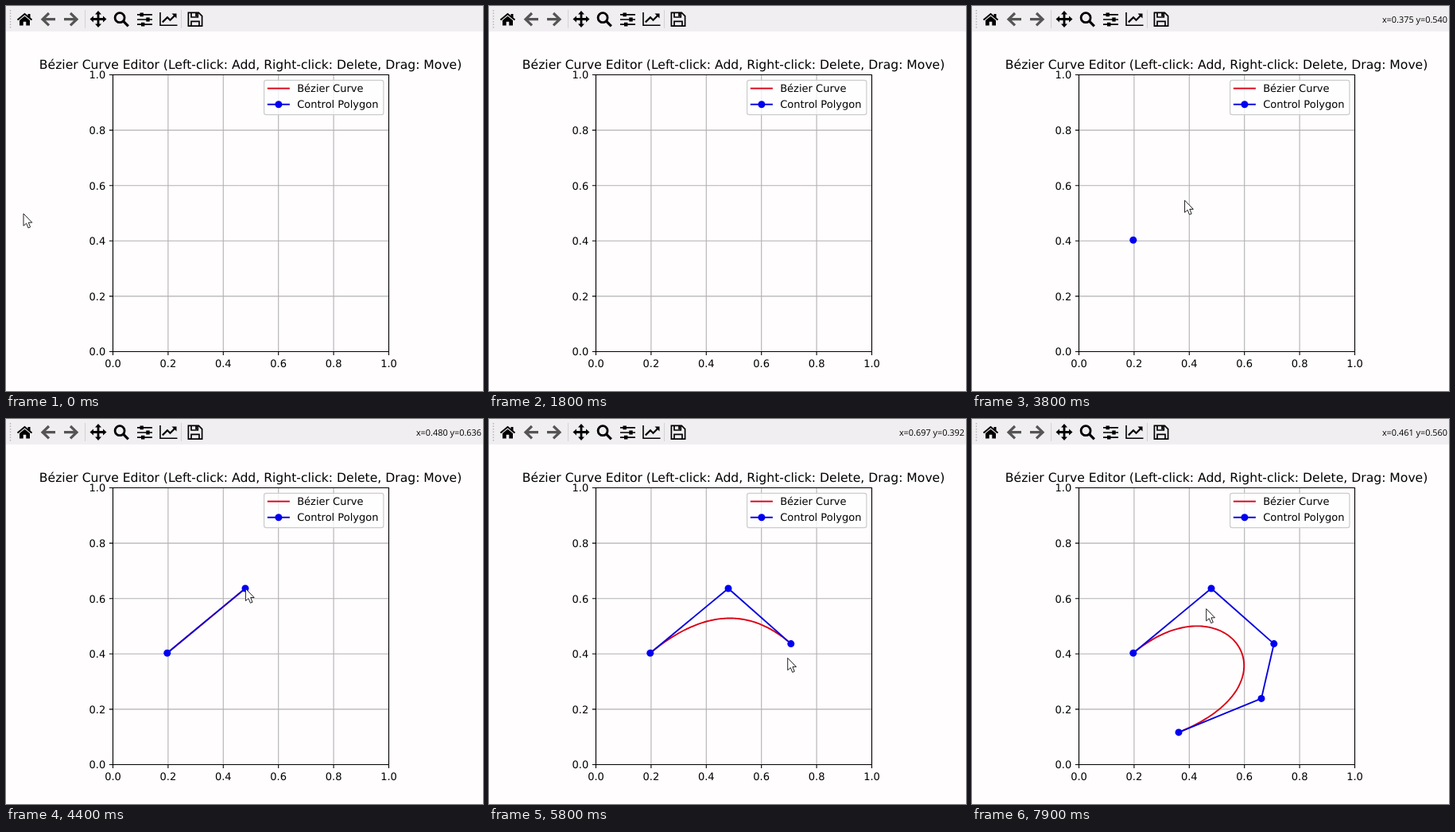
An HTML page that plays this animation: 600 by 484 pixels, repeating every 8000 ms.

```html
<!DOCTYPE html>
<html lang="en">
<head>
<meta charset="utf-8">
<title>Bézier Curve Editor</title>
<style>
  html, body { margin: 0; width: 100%; height: 100%; overflow: hidden; background: #fffdfe; }
  svg { display: block; width: 600px; height: 484px; }
  text { font-family: "DejaVu Sans", sans-serif; font-size: 13.02px; text-rendering: geometricPrecision; }
  #title { font-size: 15.62px; text-anchor: middle; }
  #readout { font: 10.9px "Open Sans", sans-serif; text-anchor: end; }
  .line { fill: none; stroke-width: 1.9; stroke-linejoin: round; }
  .red { stroke: #d90016; }
  .blue { stroke: #0400de; }
  .dot { fill: #0000f0; }
  .icon { fill: none; stroke: #000; }
</style>
</head>
<body>
<svg viewBox="0 0 600 484">
  <rect width="600" height="484" fill="#fffdfe"/>
  <rect width="600" height="32" fill="#f0eef0"/>
  <path d="M5.5 5V29" stroke="#b5b3b5" stroke-width="1.5" stroke-dasharray="1.5 2"/>
  <path d="M99.5 5V28M220.5 5V28" stroke="#d4d2d4"/>

  <!-- home -->
  <path d="M14.5 17.6L23.5 10L32.5 17.6" class="icon" stroke-width="2"/>
  <path d="M27.5 10H30.5V15L27.5 12.5ZM17 18L23.5 12.7L30 18V24.5H25.3V19.8H21.7V24.5H17Z"/>
  <!-- back, forward -->
  <g class="icon" style="stroke:#555" stroke-width="3.2">
    <path d="M54 9L46 16.7L54 24.4M46.5 16.7H62"/>
    <path d="M81 9L89 16.7L81 24.4M88.5 16.7H73"/>
  </g>
  <!-- pan -->
  <path d="M109 16.5H123M116 9.5V23.5" class="icon" stroke-width="2.8"/>
  <path d="M116 6L120 10.5H112ZM116 27L120 22.5H112ZM105.5 16.5L110 12.5V20.5ZM126.5 16.5L122 12.5V20.5Z"/>
  <!-- zoom -->
  <g class="icon" stroke-width="2.8">
    <circle cx="143.1" cy="14.7" r="6"/>
    <path d="M147.6 19.2L153.8 25.4" stroke-width="3.2"/>
  </g>
  <!-- sliders -->
  <g class="icon">
    <path d="M165 10.8H184M165 17H184M165 23.2H184" stroke-width="1.7"/>
    <path d="M170.7 8.4V13.2M178.5 14.6V19.4M172.2 20.8V25.6" stroke-width="4.4"/>
  </g>
  <!-- chart -->
  <path d="M194 8V24.3H215.5" class="icon" stroke-width="1.6"/>
  <path d="M196.8 20.4L203 14.2L206.5 17.7L212.2 12" class="icon" stroke-width="2.2"/>
  <path d="M208.5 9.5H214.5V15.5Z"/>
  <!-- save -->
  <g class="icon" stroke-width="1.7">
    <path d="M229.4 8.4H242.3L246.6 12.7V25.2H229.4Z"/>
    <path d="M233 8.5V14H241.3V8.5M233 25V19.4H243V25"/>
    <path d="M239.3 9V13" stroke-width="2.2"/>
  </g>
  <text id="readout" x="598" y="20.5"></text>

  <g id="axes"></g>
  <text id="title" x="307.6" y="78.5">Bézier Curve Editor (Left-click: Add, Right-click: Delete, Drag: Move)</text>

  <path id="curve" class="line red"/>
  <path id="polygon" class="line blue"/>
  <g id="dots"></g>

  <rect x="324.6" y="93.4" width="150.3" height="43.2" rx="2.6" fill="#fff" fill-opacity=".8" stroke="#ccc" stroke-width="1.2"/>
  <path d="M328.8 103.6H356.9" class="line red"/>
  <path d="M328.8 123.7H356.9" class="line blue"/>
  <circle cx="342.9" cy="123.7" r="4.5" class="dot"/>
  <text x="366.2" y="108.3">Bézier Curve</text>
  <text x="366.2" y="128.3">Control Polygon</text>

  <path id="cursor" d="M0 0V15.3L3.6 12.2L6 18L8.6 16.9L6.2 11.2H10.8Z" fill="#fff" stroke="#222"/>
</svg>
<script>
const $ = id => document.getElementById(id);
const LOOP = 8000, STEP = 100, READOUT_LAG = 15, CLICK_LEAD = 60;
const HIDE = 1800, SHOW = 2300;
const box = { left: 134.5, top: 86.5, right: 481.5, bottom: 434.5 };

// The pointer rests at each stop; clicks add a control point just before it leaves.
// "via" bends the way that leads to the stop.
const stops = [
  { x: 22, y: 261, arrive: 0, leave: 0 },
  { x: 333, y: 106, arrive: 700, leave: 2200, via: [-35, 495] },
  { x: 202.8, y: 294.2, arrive: 3200, leave: 3360, via: [270, 560], click: true },
  { x: 301, y: 213, arrive: 4100, leave: 4360, via: [256, 258], click: true },
  { x: 379.8, y: 282.6, arrive: 5350, leave: 5600, via: [343, 245], click: true },
  { x: 364, y: 351.4, arrive: 6200, leave: 6560, click: true },
  { x: 260, y: 393.9, arrive: 6965, leave: 7560, click: true },
  { x: 294.7, y: 238.6, arrive: 7900, leave: LOOP }
];
const clicks = stops.filter(s => s.click);

const smooth = k => k * k * (3 - 2 * k);
const mix = (a, b, k) => a.map((v, i) => v + (b[i] - v) * k);
const place = s => [s.x, s.y];

function bezier(pts, u) {
  while (pts.length > 1) pts = pts.slice(1).map((p, i) => mix(pts[i], p, u));
  return pts[0];
}

function pointerAt(t) {
  const i = stops.findIndex(s => t <= s.leave), to = stops[i];
  if (t >= to.arrive) return place(to);
  const from = stops[i - 1];
  const k = smooth((t - from.leave) / (to.arrive - from.leave));
  return bezier(to.via ? [place(from), to.via, place(to)] : [place(from), place(to)], k);
}

const toPath = pts => pts.length > 1 ? "M" + pts.map(p => p.map(v => v.toFixed(2)).join(" ")).join("L") : "";

function drawAxes() {
  let grid = "", ticks = "", labels = "";
  for (let i = 0; i <= 5; i++) {
    const [x, y] = mix([box.left, box.bottom], [box.right, box.top], i / 5);
    const value = (i / 5).toFixed(1);
    grid += `M${x} ${box.top}V${box.bottom}M${box.left} ${y}H${box.right}`;
    ticks += `M${x} ${box.bottom}v4.6M${box.left} ${y}h-4.6`;
    labels += `<text x="${x}" y="454" text-anchor="middle">${value}</text>` +
      `<text x="125.2" y="${y + 4.8}" text-anchor="end">${value}</text>`;
  }
  $("axes").innerHTML =
    `<path d="${grid}" stroke="#b3b1b3" stroke-width="1.1"/>` +
    `<path d="${ticks}M${box.left} ${box.top}H${box.right}V${box.bottom}H${box.left}Z" fill="none" stroke="#000" stroke-width="1.1"/>` +
    labels;
  $("dots").innerHTML = clicks.map(s => `<circle cx="${s.x}" cy="${s.y}" r="4.5" class="dot"/>`).join("");
}

function render(time) {
  const t = Math.floor(time % LOOP / STEP) * STEP;
  const active = clicks.filter(s => t >= s.leave - CLICK_LEAD).map(place);
  const samples = active.length > 1 ? Array.from({ length: 101 }, (_, i) => bezier(active, i / 100)) : [];
  $("curve").setAttribute("d", toPath(samples));
  $("polygon").setAttribute("d", toPath(active));
  [...$("dots").children].forEach((dot, i) => dot.setAttribute("visibility", i < active.length ? "visible" : "hidden"));

  const [x, y] = pointerAt(t);
  $("cursor").setAttribute("transform", `translate(${x} ${y})`);
  $("cursor").setAttribute("visibility", t >= HIDE && t < SHOW ? "hidden" : "visible");

  const [rx, ry] = pointerAt(Math.max(0, t - READOUT_LAG));
  const u = (rx - box.left) / (box.right - box.left), v = (box.bottom - ry) / (box.bottom - box.top);
  $("readout").textContent = t >= SHOW ? `x=${u.toFixed(3)} y=${v.toFixed(3)}` : "";
}

drawAxes();
let start;
function tick(now) {
  start ??= now;
  render(now - start);
  requestAnimationFrame(tick);
}
render(0);
requestAnimationFrame(tick);
</script>
</body>
</html>
```
